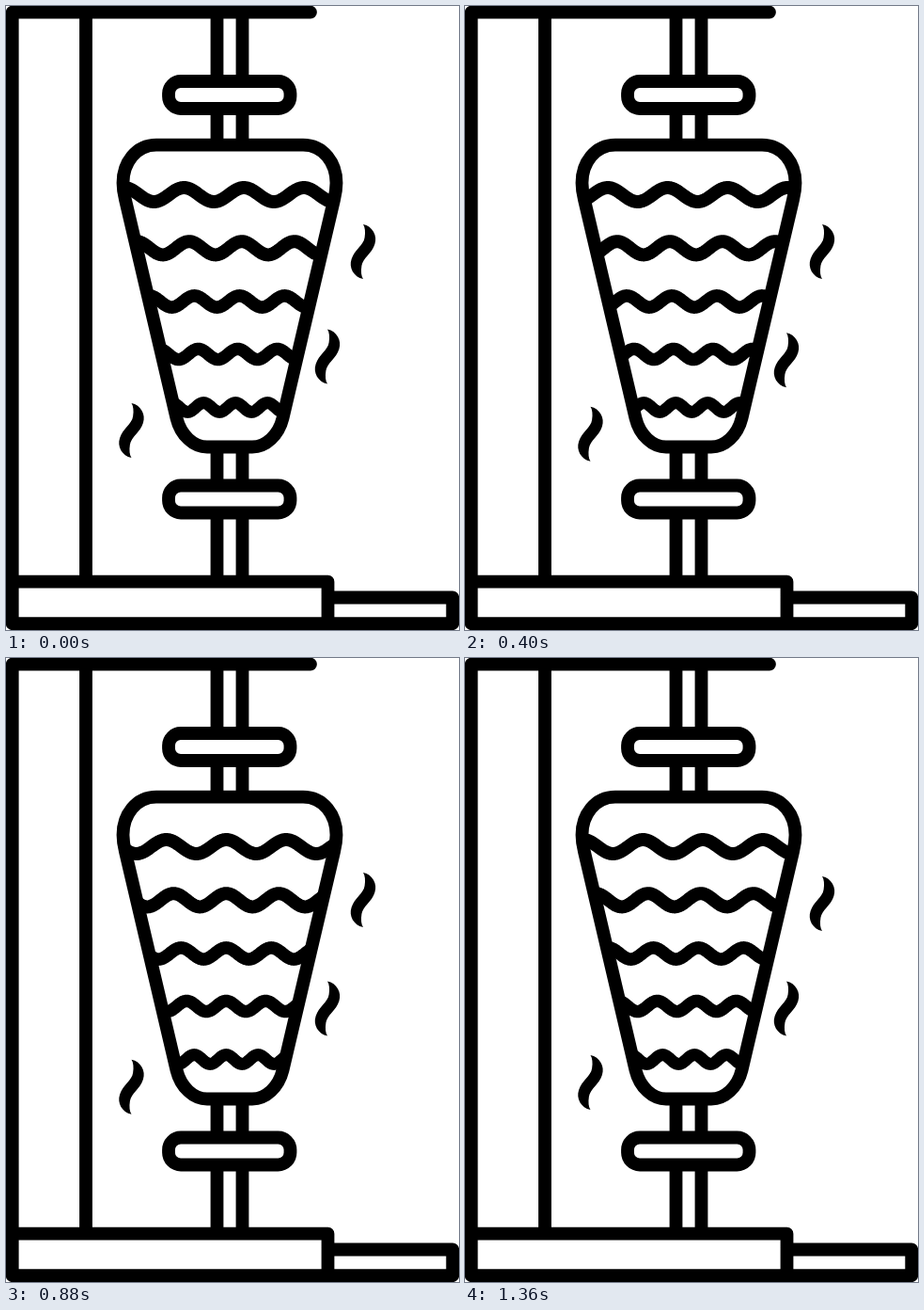
Animation, 482 px wide and 663 px high, one loop 1.4 s. Source, as an HTML page with a canvas:

```html
<!DOCTYPE html>
<html lang="en">
<head>
<meta charset="utf-8">
<title>Rotating kebab grill</title>
<style>
  html, body { margin: 0; width: 100%; height: 100%; overflow: hidden; background: #fff; }
  canvas { display: block; }
</style>
</head>
<body>
<canvas id="stage" width="482" height="663"></canvas>
<script>
const ctx = document.getElementById('stage').getContext('2d');
const LOOP = 1400, STEP = 40, TURN = 1360;
const TAU = Math.PI * 2;
const LINE = 13.8;

const stand = new Path2D(
  'M324 6.6H6.7V656.2H475.2V628.5H342.5M6.7 611.7H342.5V656.2M85 6.6V611.7' +
  'M224.5 6.6V80M251.5 6.6V80M224.5 109V147M251.5 109V147' +
  'M224.5 469V509M251.5 469V509M224.5 538.5V611M251.5 538.5V611');
const plates = new Path2D();
for (const y of [80, 509.5]) plates.roundRect(173, y, 129.5, 29, 13);

const meat = new Path2D(
  'M160 147.7H316C338 147.7 351.5 167 351.5 188Q351.5 196 349 206' +
  'L294.5 438C290.1 455.9 276.6 468.5 262 468.5H214C199.4 468.5 185.9 455.9 181.5 438' +
  'L127 206Q124.5 196 124.5 188C124.5 167 138 147.7 160 147.7Z');

// Point-symmetric wisp around its own centre
const wisp = new Path2D(
  'M0-29C10-27 15.5-17 12.4-8C9.4 2-0.6 7-1.6 15C-2.6 21-2 26 0 29' +
  'C-10 27-15.5 17-12.4 8C-9.4-2 0.6-7 1.6-15C2.6-21 2-26 0-29Z');

const waves = [
  { y: 200.5, amp: 7.5, length: 63.8, width: 14 },
  { y: 257.3, amp: 7.1, length: 56, width: 14 },
  { y: 314, amp: 6.1, length: 48, width: 13.6 },
  { y: 370, amp: 5.6, length: 42, width: 13.4 },
  { y: 426.5, amp: 4.9, length: 34, width: 13 }
];
const steam = [
  { x: 380, y: 259.5, amp: 2.6, peak: 200 },
  { x: 342, y: 373.6, amp: 2.6, peak: 440 },
  { x: 133.5, y: 454, amp: 2.9, peak: 680 }
];

function drawWave({ y, amp, length, width }, turn) {
  const crest = 234 + (0.3 - 2 * turn) * length;
  ctx.lineWidth = width;
  ctx.beginPath();
  for (let x = 110; x <= 366; x++) {
    ctx.lineTo(x, y - amp * Math.cos(TAU * (x - crest) / length));
  }
  ctx.stroke();
}

function drawSteam({ x, y, amp, peak }, time) {
  ctx.save();
  ctx.translate(x, y + amp * Math.cos(TAU * (time - peak) / TURN));
  ctx.fill(wisp);
  ctx.restore();
}

function draw(now) {
  const time = Math.floor((now % LOOP) / STEP) * STEP;
  ctx.fillStyle = '#fff';
  ctx.fillRect(0, 0, 482, 663);
  ctx.strokeStyle = '#000';
  ctx.lineCap = ctx.lineJoin = 'round';

  ctx.lineWidth = LINE;
  ctx.stroke(stand);
  ctx.fill(plates);
  ctx.fill(meat);
  ctx.stroke(plates);

  ctx.save();
  ctx.clip(meat);
  for (const wave of waves) drawWave(wave, time / TURN);
  ctx.restore();
  ctx.lineWidth = LINE;
  ctx.stroke(meat);

  ctx.fillStyle = '#000';
  for (const puff of steam) drawSteam(puff, time);
}

let start;
function tick(now) {
  start ??= now;
  draw(Math.max(0, now - start));
  requestAnimationFrame(tick);
}
draw(0);
requestAnimationFrame(tick);
</script>
</body>
</html>
```
